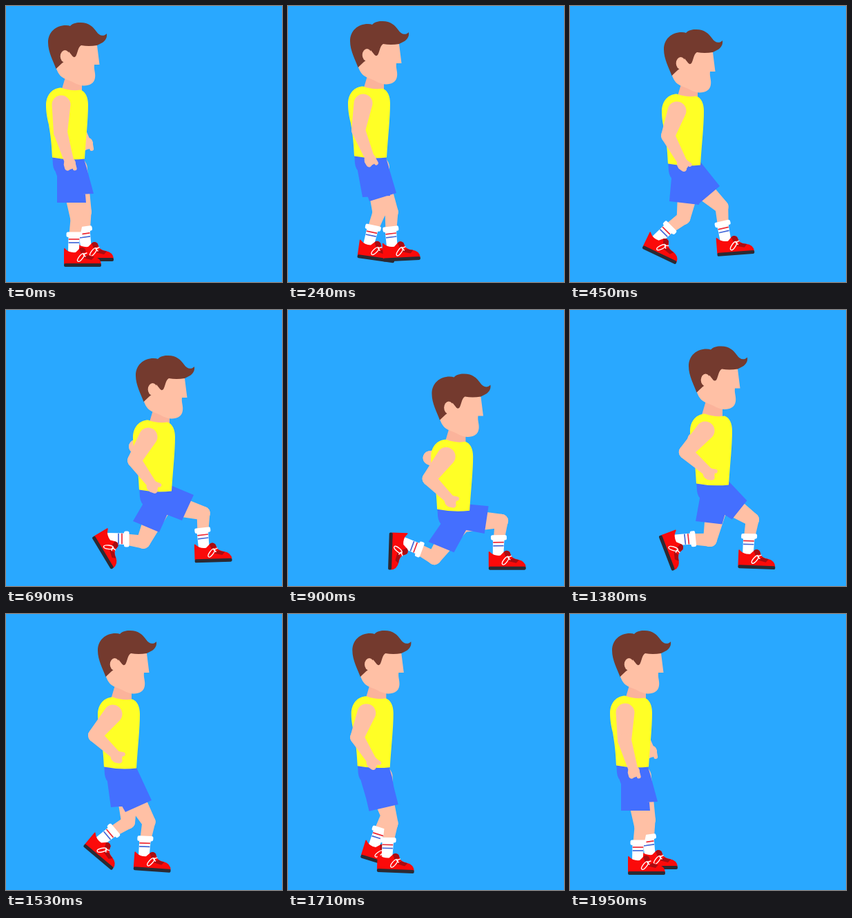
An HTML page that plays this animation: 400x400 px, repeating every 2.25 s.

```html
<!DOCTYPE html>
<html lang="en">
<head>
<meta charset="utf-8">
<title>Forward lunge</title>
<style>
html, body { margin: 0; width: 100%; height: 100%; overflow: hidden; background: #29a8ff; }
svg { display: block; width: 100vw; height: 100vh; }
.skin { fill: #ffc0a5; }
.neck { fill: #fbb39b; }
.hair { fill: #743a2e; }
.shirt { fill: #ffff26; }
.shorts { fill: #446fff; }
.white { fill: #fff; }
.red { fill: #fb0a0a; }
.dark { fill: #a80c12; }
.sole { fill: #2c2a33; }
.lace { fill: none; stroke: #fff; stroke-width: 1.4; stroke-linecap: round; }
</style>
</head>
<body>
<svg viewBox="0 0 400 400">
  <defs>
    <g id="shank">
      <path class="skin" d="M-3.5 -48 L-6 -20 H9.5 L15 -46 Z"/>
      <circle class="skin" cx="6" cy="-50" r="10"/>
      <path class="white" d="M-6.500 -24 H10 L8.500 2 Q0 7 -7 2 Z"/>
      <rect class="white" x="-9.500" y="-29.500" width="23" height="7.500" rx="2.500"/>
      <path d="M-6.300 -19 H9.300" stroke="#ee2b35" stroke-width="1.700"/>
      <path d="M-6.300 -14 H9" stroke="#4267d8" stroke-width="1.700"/>
    </g>
    <g id="shoe">
      <path class="red" d="M-13 17 V-5 Q-12.500 -7 -10.500 -4.500 Q-5 1 4 0 L9 -5 Q13 -9 17.500 -5 L20 1 Q23 5 30 6 Q40 8 41 17 Z"/>
      <path class="dark" d="M9 -5 Q13 -9 17.500 -5 L19 -1 L12 2 Z M15 8 L22 4 Q26 6 31 6.500 L27 11 Z"/>
      <rect class="sole" x="-13" y="16" width="54" height="5" rx="2"/>
      <ellipse class="lace" cx="11.500" cy="7.500" rx="2.700" ry="7" transform="rotate(38 11.500 7.500)"/>
      <path class="lace" d="M15 3 L20 1 M15 3 L18 6"/>
    </g>
    <g id="hand" class="skin">
      <ellipse cx="-2" cy="0" rx="8.500" ry="8.500"/>
      <rect x="-5" y="-8" width="15" height="6" rx="3"/>
      <rect x="-6" y="0.500" width="13.500" height="8.500" rx="4.200"/>
    </g>
  </defs>
  <g class="skin">
    <path id="farUpperArm"/>
    <path id="farForearm"/>
  </g>
  <use id="farHand" href="#hand"/>
  <path id="farThigh" class="skin"/>
  <use id="farShank" href="#shank"/>
  <use id="farShoe" href="#shoe"/>
  <path id="nearThigh" class="skin"/>
  <use id="nearShank" href="#shank"/>
  <use id="nearShoe" href="#shoe"/>
  <path id="shorts" class="shorts"/>
  <g id="head">
    <path class="neck" d="M87 100 L110 108 V127 H79 Z"/>
    <path class="skin" d="M80 70 L100 50 L132 57 L135.500 85 H128 C127 92 130 97 129 104 C128 112 121 115.500 113 115.500 C104 115.500 98 110 89 107 C80 104 76 99 73 91 Z"/>
    <path class="hair" d="M72.500 91 C69 81 61 67 61 53 C61 38 72 28 87 28 Q91 28 93 29 C98 24 104 24 108 24 C120 24 126 30 131 37 C135 43 141 45 146 40 C147 47 143 52 136 55 L132 57 Q120 59 109 57 C104 60 104 68 101 73 Q98 76 95 71 L91 66 L88 78 L81 83 Z"/>
    <ellipse class="skin" cx="85.500" cy="73" rx="6.800" ry="9"/>
  </g>
  <path id="torso" class="shirt" d="M67 219.500 C66 195 64 185 62 172 C59 160 58 152 58 144 C58 128 68 118.500 80 118.500 Q95 124 108 121.500 C115 124 119 132 119 143 C119 165 116 190 114 221.500 Q90 224 67 219.500 Z"/>
  <g class="skin">
    <path id="nearUpperArm"/>
    <path id="nearForearm"/>
  </g>
  <use id="nearHand" href="#hand"/>
</svg>
<script>
const LOOP = 2250, MOVE = 1950, STEP = 30;
const TIMES = [0, 240, 450, 690, 960, 1200, 1530, MOVE];

// Smooth track through its keys that never overshoots; it ends where it began.
function track(...keys) {
  const v = [...keys, keys[0]], last = v.length - 1;
  const rise = i => (v[i + 1] - v[i]) / (TIMES[i + 1] - TIMES[i]);
  const slope = v.map((_, i) => {
    if (i === 0 || i === last) return 0;
    const a = rise(i - 1), b = rise(i);
    return a * b > 0 ? 2 * a * b / (a + b) : 0;
  });
  return t => {
    let i = 0;
    while (i < last - 1 && t >= TIMES[i + 1]) i++;
    const h = TIMES[i + 1] - TIMES[i], s = (t - TIMES[i]) / h, r = 1 - s;
    return v[i] * (1 + 2 * s) * r * r + v[i + 1] * s * s * (3 - 2 * s)
      + h * s * r * (slope[i] * r - slope[i + 1] * s);
  };
}
const point = (xs, ys) => {
  const x = track(...xs), y = track(...ys);
  return t => [x(t), y(t)];
};

const body = point([0, 29, 75, 126, 151, 150, 75], [0, -2, 9, 41, 72, 71, 2]);
const head = point([0, 29, 75, 127, 149, 145, 72], [0, -2, 10, 42, 71, 68, 0]);

const arms = {
  near: {
    shoulder: [80, 143],
    elbow: point([79, 102, 142, 186, 206, 204, 129], [183, 180, 188, 218, 247, 246, 176]),
    hand: point([93, 120, 165, 214, 239, 238, 162], [230, 224, 230, 256, 279, 278, 207]),
    turn: track(75, 60, 35, 20, 10, 10, 10)
  },
  far: {
    shoulder: [92, 143],
    elbow: point([96, 116, 156, 188, 207, 206, 150], [160, 170, 185, 198, 216, 215, 165]),
    hand: point([118, 130, 172, 225, 246, 245, 165], [201, 195, 205, 225, 240, 239, 180]),
    turn: track(80, 70, 50, 30, 20, 20, 40)
  }
};

const legs = {
  near: {
    hip: [95, 236],
    ankle: point([97, 150, 225, 286, 305, 305, 199], [357, 349, 341, 345, 357, 357, 351]),
    lean: track(0, -7, -13, -7, 0, 0, 2),
    foot: track(0, -3, -4.5, -2, 0, 0, 4),
    hemBack: point([74, 118, 185, 255, 287, 287, 173], [285, 283, 288, 305, 326, 325, 287]),
    hemFront: point([116, 157, 217, 272, 292, 292, 211], [285, 271, 261, 268, 286, 285, 270])
  },
  far: {
    hip: [100, 236],
    ankle: point([115, 116, 125, 149, 169, 169, 135], [349, 346, 338, 330, 337, 337, 329]),
    lean: track(-8, 12, 45, 90, 112, 112, 50),
    foot: track(0, 8, 25.5, 59, 95, 95, 40),
    hemBack: point([84, 108, 144, 184, 205, 205, 152], [274, 277, 283, 306, 339, 338, 280]),
    hemFront: point([127, 148, 187, 222, 242, 242, 192], [272, 275, 288, 322, 354, 353, 277])
  }
};

const el = id => document.getElementById(id);
const add = (p, q) => [p[0] + q[0], p[1] + q[1]];
const shape = (id, d) => el(id).setAttribute("d", d);
const place = (id, [x, y], turn = 0) =>
  el(id).setAttribute("transform", `translate(${x} ${y}) rotate(${turn})`);

function rotate([x, y], degrees) {
  const a = degrees * Math.PI / 180, c = Math.cos(a), s = Math.sin(a);
  return [x * c - y * s, x * s + y * c];
}

// Tapered capsule from a to b.
function limb(a, b, ra, rb) {
  const dx = b[0] - a[0], dy = b[1] - a[1], len = Math.hypot(dx, dy) || 1;
  const side = (p, r) => [p[0] - dy / len * r, p[1] + dx / len * r];
  return `M${side(a, ra)} L${side(b, rb)} A${rb} ${rb} 0 0 0 ${side(b, -rb)} `
    + `L${side(a, -ra)} A${ra} ${ra} 0 0 0 ${side(a, ra)} Z`;
}

function drawArm(name, t, base) {
  const arm = arms[name], elbow = arm.elbow(t), hand = arm.hand(t);
  shape(name + "UpperArm", limb(add(arm.shoulder, base), elbow, 13.5, 10));
  shape(name + "Forearm", limb(elbow, hand, 10, 6.5));
  place(name + "Hand", hand, arm.turn(t));
}

function drawLeg(name, t, base) {
  const leg = legs[name], ankle = leg.ankle(t), lean = leg.lean(t);
  const knee = add(ankle, rotate([6, -50], lean));
  shape(name + "Thigh", limb(add(leg.hip, base), knee, 18, 10));
  place(name + "Shank", ankle, lean);
  place(name + "Shoe", ankle, leg.foot(t));
}

function drawShorts(t, base) {
  const at = (x, y) => add([x, y], base);
  const { near, far } = legs;
  shape("shorts",
    `M${at(67, 214)} L${at(68, 230)} Q${at(69, 239)} ${at(75, 243)} L${at(112, 243)} L${at(114, 214)} Z `
    + `M${at(110, 212)} L${at(70, 214)} L${at(74, 243)} L${near.hemBack(t)} L${near.hemFront(t)} Z `
    + `M${at(110, 212)} L${at(70, 214)} L${at(72, 241)} L${far.hemBack(t)} L${far.hemFront(t)} L${at(117, 235)} Z`);
}

function draw(t) {
  const base = body(t);
  place("torso", base);
  place("head", head(t));
  for (const side of ["far", "near"]) {
    drawArm(side, t, base);
    drawLeg(side, t, base);
  }
  drawShorts(t, base);
}

const start = performance.now();
function tick() {
  const t = (performance.now() - start) % LOOP;
  draw(Math.min(MOVE, Math.floor(t / STEP) * STEP));
  requestAnimationFrame(tick);
}
tick();
</script>
</body>
</html>
```
